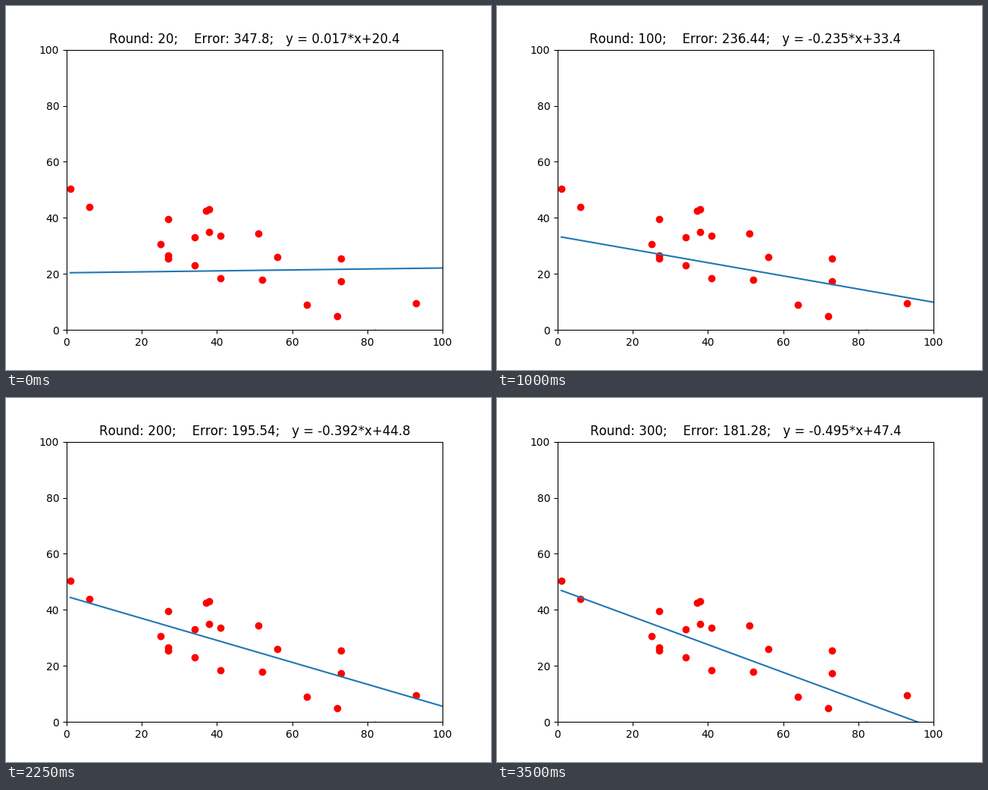
Recreate the animation shown at these times as a matplotlib script. Size 640 by 480 pixels, loop 3750 ms.

```python
import matplotlib.pyplot as plt
import numpy as np
from matplotlib.animation import FuncAnimation

STEP, LAST = 20, 300

POINTS = [
    (1, 50.4), (6, 43.8), (25, 30.6), (27, 39.6), (27, 26.6), (27, 25.5),
    (34, 33.0), (34, 23.0), (37, 42.5), (38, 43.0), (38, 35.0), (41, 33.6),
    (41, 18.5), (51, 34.4), (52, 17.9), (56, 26.0), (64, 9.0), (72, 5.0),
    (73, 25.5), (73, 17.4), (82, -1.0), (93, 9.5),
]

# Bends in the descent; the fit moves evenly between them
KEY_ROUNDS = [20, 40, 100, 160, 200, 240, 280, 300]
KEY_ERRORS = [347.8, 307.67, 236.44, 205.69, 195.54, 187.42, 181.35, 181.28]
KEY_SLOPES = [0.017, -0.041, -0.235, -0.343, -0.392, -0.443, -0.494, -0.495]
KEY_OFFSETS = [20.4, 26.8, 33.4, 40.8, 44.8, 46.6, 47.0, 47.4]


def value_at(n, keys, digits):
    return round(float(np.interp(n, KEY_ROUNDS, keys)), digits)


plt.rcParams["font.family"] = "DejaVu Sans"
plt.rcParams["text.kerning_factor"] = 6  # whole-pixel letter spacing

fig, ax = plt.subplots(figsize=(6.4, 4.8), dpi=100)
ax.plot(*zip(*POINTS), "ro")
line, = ax.plot([], [], color="#1f77b4")
ax.set_xlim(0, 100)
ax.set_ylim(0, 100)
title = ax.set_title("")
xs = np.array([1, 101])


def update(n):
    error = value_at(n, KEY_ERRORS, 2)
    slope = value_at(n, KEY_SLOPES, 3)
    offset = value_at(n, KEY_OFFSETS, 1)
    line.set_data(xs, slope * xs + offset)
    title.set_text(f"Round: {n};    Error: {error};   y = {slope}*x+{offset}")
    return line, title


anim = FuncAnimation(fig, update, frames=range(STEP, LAST + 1, STEP),
                     interval=250, repeat=True, repeat_delay=0, blit=False)
plt.show()
```
